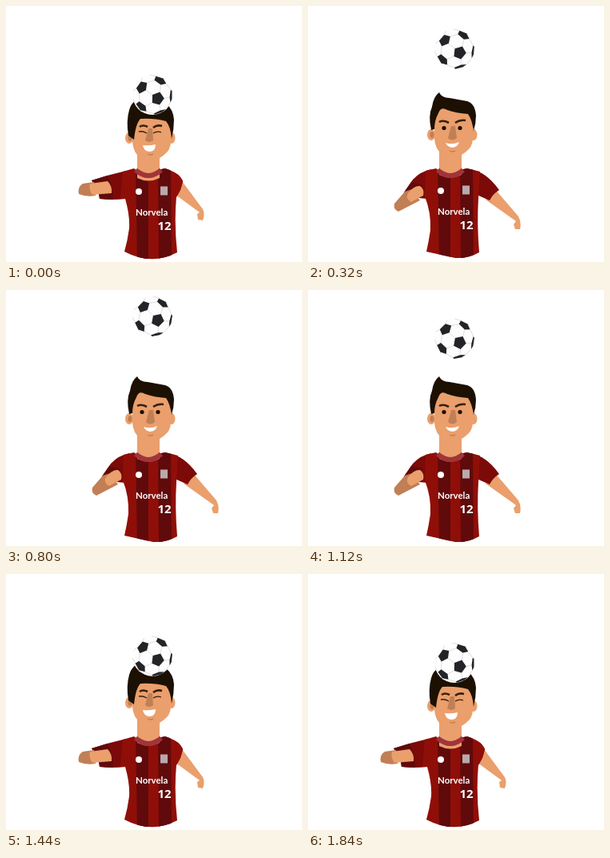
Recreate the animation shown at these times as an HTML page. Size 370 px wide and 320 px high, loop 2 s.

```html
<!DOCTYPE html>
<html lang="en">
<head>
<meta charset="utf-8">
<title>Header practice</title>
<style>
html, body { margin: 0; width: 100%; height: 100%; overflow: hidden; background: #fff; }
svg { display: block; width: 370px; height: 320px; }
text { fill: #fff; font-weight: 700; }
.red { fill: #8f0f08; }
.dark { fill: #600a0c; }
.shade { fill: #7b0a09; }
.skin { fill: #ea9f6c; }
.tan { fill: #c17f55; }
.hair { fill: #1c1003; }
.line { fill: none; stroke: #38200f; }
</style>
</head>
<body>
<svg viewBox="0 0 370 320">
  <defs><clipPath id="torsoClip"><path id="torsoEdge"/></clipPath></defs>

  <path id="rightArm" class="skin"/>
  <path id="rightSleeve" class="shade"/>
  <path id="leftSleeve" class="shade"/>
  <path id="leftBand" class="dark"/>
  <path id="torso" class="red"/>
  <path class="dark" clip-path="url(#torsoClip)" d="M162 200H178V320H164ZM190 200H206L207 320H191Z"/>

  <g id="head">
    <g class="skin">
      <ellipse cx="154" cy="161" rx="5" ry="7"/>
      <ellipse cx="207" cy="161" rx="4.500" ry="7"/>
    </g>
    <ellipse class="tan" cx="155" cy="161" rx="2.500" ry="4"/>
    <path class="skin" d="M158 126H206V160Q207 173 201 179Q197 183 192 186V211Q178 218 164 211V182Q157 174 158 158Z"/>
    <g id="openFace">
      <path class="tan" d="M179 150L175 165Q180 170 186 165L184 150Z"/>
      <path class="hair" d="M154 155Q150 137 155 126Q157 113 164 108Q167 115 177 115L199 119Q209 122 210 137Q210 147 207 156Q205 142 200 135Q185 134 174 130Q166 125 163 134Q158 143 158 154Z"/>
      <path class="line" stroke-width="2.600" d="M164 145Q169 142 176 146M184 146Q190 142 197 143"/>
      <circle class="hair" cx="170" cy="152.500" r="2.600"/>
      <circle class="hair" cx="190" cy="152.500" r="2.600"/>
      <path fill="#fff" d="M172 171Q180 174 189 170Q187 177 180 177Q174 176 172 171Z"/>
    </g>
    <g id="happyFace">
      <path class="tan" d="M178 149L174 164Q179 168 184 164L183 149Z"/>
      <path class="hair" d="M153 158Q150 140 154 126Q156 118 164 112L200 118Q209 125 210 138Q210 150 207 162Q206 147 200 140Q185 136 168 137Q162 143 160 163Z"/>
      <path class="line" stroke-width="2.600" d="M167 147Q171 144 177 147M184 148Q189 144 195 146"/>
      <path class="line" stroke-width="1.300" d="M166 153Q171 152 176 155M184 155Q189 152 194 154"/>
      <path fill="#fff" d="M171 170Q179 171 187 169Q187 178 179 178Q172 177 171 170Z"/>
    </g>
    <path fill="none" stroke="#c17f55" stroke-width="1.500" d="M177 181Q180 183 184 181"/>
  </g>

  <path fill="none" stroke="#a0343a" stroke-width="6" d="M162 205Q178 219 194 205"/>
  <path id="leftElbow" class="tan"/>
  <path id="leftHand" class="skin"/>

  <g id="print">
    <circle cx="165.500" cy="231" r="4" fill="#fff"/>
    <rect x="192.500" y="224.500" width="9" height="11" fill="#b9a9ad"/>
    <text x="161.500" y="260.500" font-size="11.500" font-family="Lato, sans-serif">Norvela</text>
    <text x="189" y="278.500" font-size="15" font-family="'Noto Sans', sans-serif">12</text>
  </g>

  <g id="ball">
    <circle r="25" fill="#fdfdfd"/>
    <path id="seams" fill="none" stroke="#e3e3e3" stroke-width=".8"/>
    <path id="patches" fill="#232427"/>
  </g>
</svg>
<script>
const LOOP = 2000, STEP = 80, LAST = 1840;
const STAND = 240, BRACE = 1360;
const $ = id => document.getElementById(id);
const lerp = (a, b, k) => a + (b - a) * k;
const clamp = k => Math.max(0, Math.min(1, k));

const nodding = {
  torso: "M160 203L146 207L143 241H149Q155 262 154 278Q152 293 148 307Q182 325 214 308Q210 272 213 238L218 230L221 219Q217 209 199 203L194 204Q178 219 160 203Z",
  leftSleeve: "M150 206Q128 211 107 218Q116 229 117 241Q132 243 150 241Z",
  leftBand: "M127 212L107 218Q116 229 117 241L134 242Q133 224 127 212Z",
  leftElbow: "M110 220L96 222Q89 226 91 235Q100 239 112 237Z",
  leftHand: "M105 222L127 219Q133 225 132 234L108 236Q103 229 105 222Z",
  rightArm: "M220 219L246 254Q249 260 246 268L240 267L239 260L242 258L212 236Z",
  rightSleeve: "M205 206Q217 209 221 219Q219 230 213 239L207 236Z"
};
const upright = {
  torso: "M160 203L147 206L146 238Q154 258 153 280Q151 294 148 307L184 315Q200 316 214 308Q211 272 213 240L215 207L199 203L194 204Q178 219 160 203Z",
  leftSleeve: "M154 204Q140 207 131 217L120 233Q130 240 150 241Z",
  leftBand: "M129 220L120 233Q130 240 142 240L143 224Z",
  leftElbow: "M121 232L108 247Q106 254 113 257L140 243L130 229Z",
  leftHand: "M125 234Q133 224 140 225Q146 229 144 237L129 245Q121 241 125 234Z",
  rightArm: "M233 228L263 263Q267 270 265 279L259 279L257 273L260 269L222 242Z",
  rightSleeve: "M201 204Q222 206 239 230Q231 235 227 243L211 236Z"
};

const nodKeys = [[0, 4], [160, -3.5], [240, 0], [1680, 0], [1840, 4]];

function track(keys, t) {
  let i = 1;
  while (i < keys.length - 1 && keys[i][0] < t) i++;
  const [t0, a] = keys[i - 1], [t1, b] = keys[i];
  return lerp(a, b, clamp((t - t0) / (t1 - t0)));
}

// Push off, rise, fall, then one small bounce on the head.
function ballHeight(t) {
  if (t <= 160) return 111 - 8 * (t / 160) ** 2;
  if (t < 530) return 30.3 + 72.7 * ((530 - t) / 370) ** 2;
  if (t < 665) return 30.3;
  if (t < 1380) return 30.3 + 30.7 * ((t - 665) / 455) ** 2;
  return 96 + 15 * ((t - 1600) / 240) ** 2;
}

// Truncated icosahedron, swaying about an axis tilted toward the viewer.
const dot = (a, b) => a.reduce((sum, n, i) => sum + n * b[i], 0);
const axis = [0.28, 0.2, Math.sqrt(1 - 0.28 ** 2 - 0.2 ** 2)];
const tilt = Math.hypot(axis[0], axis[1]);
const [ux, uy] = [axis[0] / tilt, axis[1] / tilt];
const across = [-ux * axis[2], -uy * axis[2], tilt];
const side = [uy, -ux, 0];

function icoPoints(spin) {
  const points = [axis, axis.map(n => -n)];
  const z = 1 / Math.sqrt(5), r = 2 * z;
  for (let i = 0; i < 10; i++) {
    const a = spin + i * Math.PI / 5, h = i % 2 ? -z : z;
    points.push(axis.map((n, j) => n * h + r * (across[j] * Math.cos(a) + side[j] * Math.sin(a))));
  }
  return points;
}

function project(p) {
  const length = p[2] < 0 ? Math.hypot(p[0], p[1]) : Math.hypot(...p);
  return `${(25 * p[0] / length).toFixed(2)} ${(25 * p[1] / length).toFixed(2)}`;
}

function drawBall(spin) {
  const points = icoPoints(spin);
  let patches = "", seams = "";
  for (const v of points) {
    const ref = Math.abs(v[2]) < 0.9 ? [0, 0, 1] : [1, 0, 0];
    const d = dot(ref, v);
    const e = ref.map((n, i) => n - d * v[i]);
    const f = [v[1] * e[2] - v[2] * e[1], v[2] * e[0] - v[0] * e[2], v[0] * e[1] - v[1] * e[0]];
    const angle = p => Math.atan2(dot(p, f), dot(p, e));
    const near = points.filter(p => dot(p, v) > 0.3 && dot(p, v) < 0.6)
      .sort((p, q) => angle(p) - angle(q));
    const corners = near.map(p => v.map((n, i) => lerp(n, p[i], 1 / 3)));
    if (v[2] > -0.1) patches += "M" + corners.map(project).join("L") + "Z";
    near.forEach((p, i) => {
      const end = v.map((n, j) => lerp(n, p[j], 2 / 3));
      if (corners[i][2] > 0 || end[2] > 0) seams += `M${project(corners[i])}L${project(end)}`;
    });
  }
  $("patches").setAttribute("d", patches);
  $("seams").setAttribute("d", seams);
}

const shift = (id, x, y) => $(id).setAttribute("transform", `translate(${x} ${y})`);
const show = (id, on) => $(id).setAttribute("visibility", on ? "visible" : "hidden");

function render(time) {
  const t = Math.min(LAST, Math.floor((time % LOOP) / STEP) * STEP);
  const standing = t >= STAND && t < BRACE;
  const pose = standing ? upright : nodding;

  for (const id in pose) $(id).setAttribute("d", pose[id]);
  $("torsoEdge").setAttribute("d", pose.torso);
  show("openFace", standing);
  show("happyFace", !standing);

  shift("head", 0, track(nodKeys, t));
  shift("print", 0.5, standing ? 0 : 1);
  shift("ball", 183, ballHeight(t));
  drawBall(0.17 * Math.sin(Math.PI * t / LAST));
}

const start = performance.now();
function tick() {
  render(performance.now() - start);
  requestAnimationFrame(tick);
}
tick();
</script>
</body>
</html>
```
